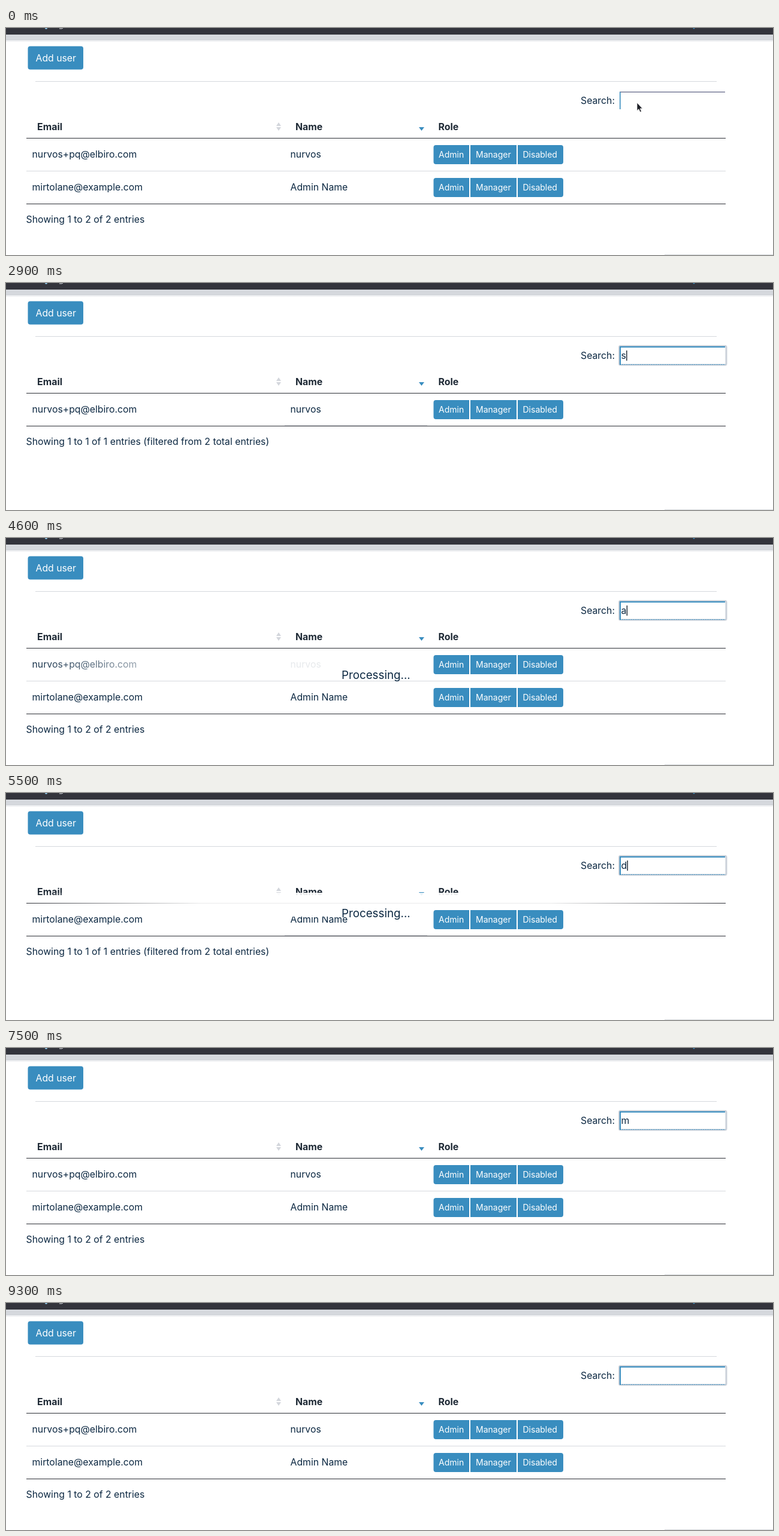
These frames come from a looping animation (1280 px wide and 380 px high, 9400 ms). An HTML page:

```html
<!DOCTYPE html>
<html lang="en">
<head>
<meta charset="utf-8">
<title>User search</title>
<style>
  html, body { margin: 0; width: 100%; height: 100%; overflow: hidden; background: #fff; }
  svg { display: block; width: 1280px; height: 380px; }
  text { font: 430 15.8px Inter, "Open Sans", sans-serif; fill: #0c2842; white-space: pre; }
  .head text { font-size: 15.9px; font-weight: 700; fill: #1f2a36; }
  .btn { fill: #398dbf; }
  .btn-text { fill: #fff; }
  .small { font-size: 14px; fill: #fff; }
  .rule { fill: #d6d9dd; }
  .dark { fill: #2c2e35; }
  #processing text { font-size: 18.75px; }
</style>
</head>
<body>
<svg viewBox="0 0 1280 380">
  <defs>
    <linearGradient id="veil">
      <stop offset="0" stop-color="#fff" stop-opacity="0"/>
      <stop offset=".25" stop-color="#fff" stop-opacity=".9"/>
      <stop offset=".75" stop-color="#fff" stop-opacity=".9"/>
      <stop offset="1" stop-color="#fff" stop-opacity="0"/>
    </linearGradient>
    <g id="roles">
      <path class="btn" d="M717.5 196H773V228H717.5a4 4 0 0 1-4-4V200a4 4 0 0 1 4-4Z"/>
      <path class="btn" d="M775 196H852V228H775Z"/>
      <path class="btn" d="M854 196H926a4 4 0 0 1 4 4V224a4 4 0 0 1-4 4H854Z"/>
      <text class="small" x="722" y="217">Admin</text>
      <text class="small" x="784" y="217">Manager</text>
      <text class="small" x="862.5" y="217">Disabled</text>
    </g>
  </defs>

  <!-- top bar -->
  <rect width="1280" height="11" fill="#33343c"/>
  <circle cx="67" cy="0" r="2" fill="#8cc4e4"/>
  <path d="M89 1h4l2-1" stroke="#e4e6ea" fill="none"/>
  <circle cx="1148" cy="0" r="1.5" fill="#398dbf"/>
  <rect y="11" width="1280" height="10" fill="#d5d8dd"/>
  <path d="M0 22.5H1280" stroke="#d5d8dd" stroke-dasharray="1 1"/>

  <rect class="btn" x="36.5" y="30.5" width="92.5" height="39" rx="4"/>
  <text class="btn-text" x="49.5" y="56">Add user</text>
  <rect class="rule" x="49" y="89" width="1137" height="1"/>
  <rect class="rule" x="1099" y="379" width="181" height="1"/>

  <!-- search field -->
  <text x="959" y="127">Search:</text>
  <g id="blurred">
    <path d="M1024 107.3H1200" stroke="#777b98" stroke-width="1.6"/>
    <path d="M1024.8 107V136" stroke="#398dbf" stroke-width="1.6"/>
  </g>
  <g id="focused" fill="none">
    <rect x="1023.5" y="105.5" width="178.5" height="31.5" rx="2" stroke="#cbd1da" stroke-width="3"/>
    <path d="M1025 137V107H1200" stroke="#398dbf" stroke-width="2"/>
    <path d="M1025 136.5H1200" stroke="#398dbf" stroke-dasharray="2 1"/>
  </g>
  <text id="query" x="1026.5" y="127"></text>
  <rect id="caret" y="113" width="1.4" height="17" fill="#14202c"/>

  <!-- table -->
  <g class="head">
    <text x="52" y="170.5">Email</text>
    <text x="483" y="170.5">Name</text>
    <text x="721.5" y="170.5">Role</text>
  </g>
  <path d="M451 164l4-6 4 6ZM451 166h8l-4 6Z" fill="#d3d6dc"/>
  <path d="M689 166h9l-4.5 6Z" fill="#398dbf"/>
  <rect class="dark" x="34" y="184" width="1167" height="1"/>

  <g id="first">
    <text x="43.5" y="217">nurvos+pq@elbiro.com</text>
    <text x="474.5" y="217">nurvos</text>
  </g>
  <g id="second">
    <text x="43.5" y="217">mirtolane@example.com</text>
    <text x="474.5" y="217">Admin Name</text>
  </g>
  <g id="pair">
    <rect class="rule" x="34" y="239" width="1167" height="1"/>
    <rect class="dark" x="34" y="294" width="1167" height="1"/>
  </g>
  <g id="single">
    <rect class="dark" x="34" y="239" width="1167" height="1"/>
    <rect class="rule" x="465" y="238" width="238" height="1"/>
  </g>
  <text id="info" x="33.5"></text>

  <g id="processing">
    <rect x="33" y="167" width="1168" height="40" fill="url(#veil)"/>
    <text x="560" y="208">Processing...</text>
  </g>
  <use href="#roles"/>
  <use id="roles2" href="#roles" y="55"/>

  <path id="pointer" d="M1053 125v13.5l3-2.8 2.2 5 2.3-1-2.2-4.8h4Z" fill="#1d1f26" stroke="#fff" stroke-width=".8"/>
</svg>
<script>
const LOOP = 9400, FOCUS = 1300, FIRST_KEY = 2500, BLINK = 500;
const BOTH = "both", FIRST = "first", SECOND = "second";

// Each list holds [start time, value] steps.
const typed = [[0, ""], [2500, "s"], [3300, ""], [4500, "a"], [4900, ""],
               [5200, "d"], [6300, ""], [7000, "m"], [8400, ""]];
const results = [[0, BOTH], [2800, FIRST], [3600, BOTH], [4800, SECOND],
                 [5100, BOTH], [5400, SECOND], [6500, BOTH]];
const busy = [[2500, 2800], [3300, 3600], [4500, 4800], [4900, 5100],
              [5200, 5600], [6300, 6500], [7100, 7400], [8400, 8700]];

const el = id => document.getElementById(id);
const show = (id, on) => el(id).style.display = on ? "" : "none";
const stepAt = (steps, t) => steps.filter(s => s[0] <= t).pop();

function draw(t) {
  const [keyTime, query] = stepAt(typed, t);
  const rows = stepAt(results, t)[1];
  const both = rows === BOTH;
  const focused = t >= FOCUS;
  const blinkStart = Math.max(keyTime, FOCUS);

  show("blurred", !focused);
  show("focused", focused);
  show("pointer", t < FIRST_KEY);
  el("query").textContent = query;
  show("caret", focused && Math.floor((t - blinkStart) / BLINK) % 2 === 0);
  el("caret").setAttribute("x", 1026.8 + (query ? el("query").getComputedTextLength() : 0));

  show("first", rows !== SECOND);
  show("second", rows !== FIRST);
  show("pair", both);
  show("single", !both);
  show("roles2", both);
  el("second").setAttribute("transform", `translate(0 ${both ? 55 : 0})`);
  el("info").setAttribute("y", both ? 326 : 271);
  el("info").textContent = both ? "Showing 1 to 2 of 2 entries"
    : "Showing 1 to 1 of 1 entries (filtered from 2 total entries)";

  show("processing", busy.some(([from, to]) => t >= from && t < to));
  el("processing").setAttribute("transform", `translate(0 ${both ? 27.5 : 0})`);
}

const start = performance.now();
function tick() {
  draw((performance.now() - start) % LOOP);
  requestAnimationFrame(tick);
}
tick();
</script>
</body>
</html>
```
